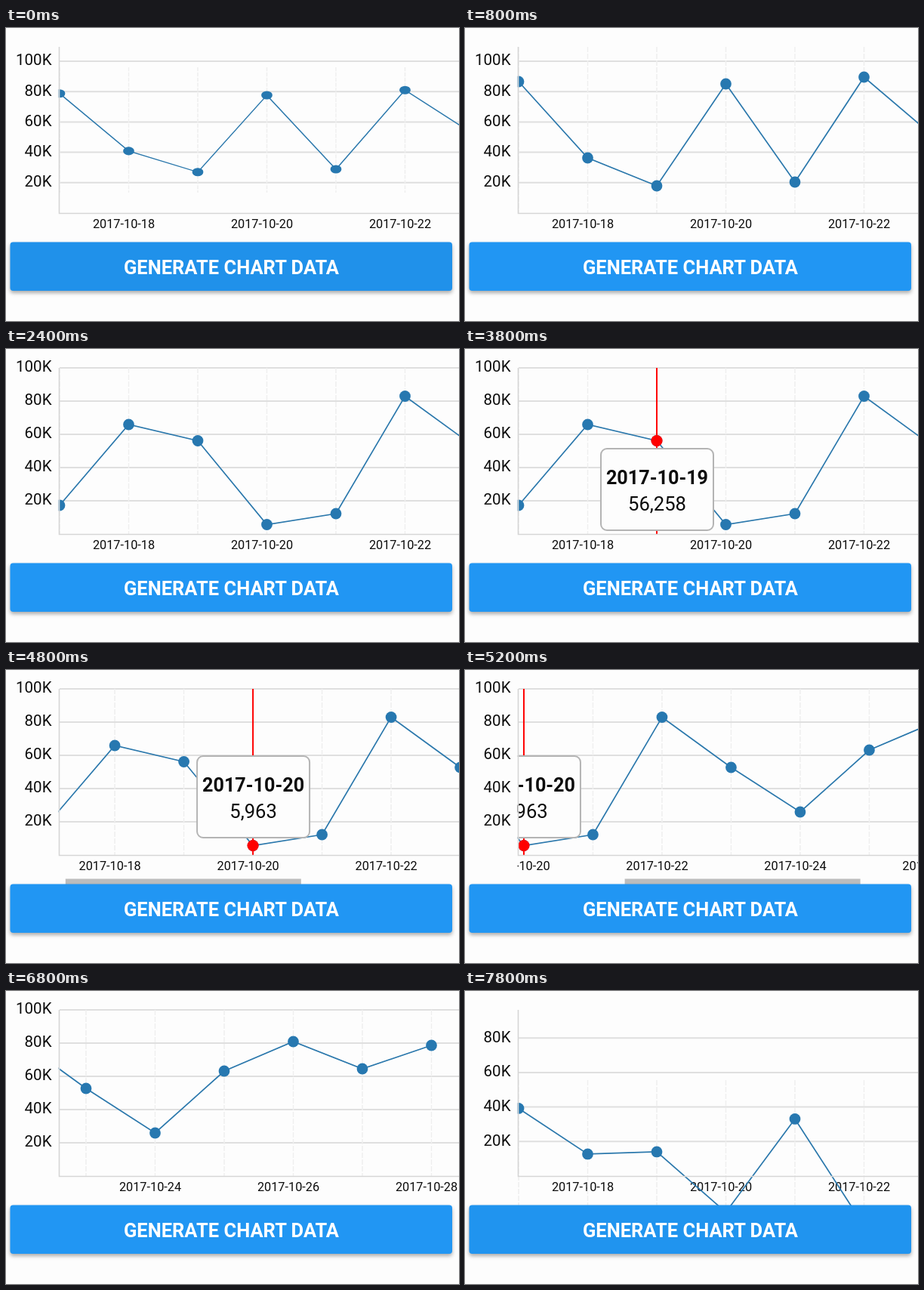
Animation, 600 px wide and 388 px high, one loop 8000 ms. Source, as an HTML page:

```html
<!DOCTYPE html>
<html lang="en">
<head>
<meta charset="utf-8">
<title>Chart data</title>
<style>
  html, body { margin: 0; width: 100%; height: 100%; overflow: hidden; background: #fdfdfd; }
  svg { display: block; width: 600px; height: 388px; font-family: Roboto, sans-serif; fill: #0c0c0c; }
  .grid { stroke: #dfdfdf; stroke-width: 2; }
  .axis { stroke: #d6d6d6; stroke-width: 1.6; }
  .day { stroke: #efefef; stroke-width: 1.5; stroke-dasharray: 7 2; }
  .line { fill: none; stroke: #2b78ac; stroke-width: 1.7; }
  .dot { fill: #2778b0; }
  .tick { font-size: 20.5px; text-anchor: end; }
  .date { font-size: 16.3px; text-anchor: middle; }
  .tip text { font-size: 25.6px; text-anchor: middle; }
  .tip .title { font-size: 25.2px; font-weight: 700; }
  .press { font-size: 25.5px; font-weight: 700; text-anchor: middle; fill: #fff; }
  .button { filter: drop-shadow(0 3px 2.5px rgba(0, 0, 0, .32)); }
</style>
</head>
<body>
<svg viewBox="0 0 600 388">
  <defs><clipPath id="view"><rect x="69.5" y="0" width="531" height="284"/></clipPath></defs>
  <g id="scales"></g>
  <g clip-path="url(#view)">
    <g id="dates"></g>
    <g id="charts"></g>
    <g id="tips"></g>
    <rect id="bar" y="276.5" width="312" height="8" fill="#bdbdbd"/>
  </g>
  <path class="axis" d="M70.5 25V245.5H600" fill="none"/>
  <rect class="button" x="5.5" y="283.5" width="585.5" height="64.5" rx="4" fill="#2196f3"/>
  <rect id="shade" x="5.5" y="283.5" width="585.5" height="64.5" rx="4" fill="#000"/>
  <text class="press" x="298.5" y="326">GENERATE CHART DATA</text>
</svg>
<script>
const LOOP = 8000, TICK = 200, ENTER = 500;
const TOP = 25, BASE = 245, MID = 135, STEP = 91.5, DAYS = 12;
const $ = id => document.getElementById(id);
const dayX = i => 71 + i * STEP;
const grow = k => `translate(0 ${MID}) scale(1 ${k}) translate(0 ${-MID})`;
const rise = k => `translate(0 ${220 * (1 - k)})`;

// gap: pixels per 20K; start: when the data set enters
const sets = [
  { start: -252, gap: 40.2, enter: grow, ys: [71, 172, 209, 74, 204, 65, 143] },
  { start: 1375, gap: 44, enter: grow,
    ys: [207, 100, 121.5, 232.5, 218, 62.5, 129, 188, 106, 67, 103, 72] },
  { start: 7625, gap: 45.7, enter: rise, ys: [62.5, 123, 120, 200, 76.5, 218, 205] }
];
const tips = [
  { from: 3200, to: 4400, day: 2, value: '56,258' },
  { from: 4400, to: 7625, day: 3, value: '5,963' }
];
const shadeSteps = [[0, .035], [500, 0], [1000, 0], [1300, .06], [1400, .06], [2000, 0], [7400, 0], [7800, .015], [LOOP, .025]];
const barSteps = [[4700, 0], [4800, 1], [6250, 1], [6650, 0]];

const repeat = (n, fn) => Array.from({ length: n }, (_, i) => fn(i)).join('');

function scaleMarkup({ gap }) {
  const rows = repeat(5, i => {
    const y = BASE - gap * (i + 1);
    return y < TOP ? '' : `<path class="grid" d="M71 ${y}H600"/>
      <text class="tick" x="60.5" y="${y + 5.3}">${(i + 1) * 20}K</text>`;
  });
  return `<g>${rows}</g>`;
}

function chartMarkup({ ys }) {
  const points = ys.map((y, i) => `${dayX(i)},${y}`).join(' ');
  return `<g>${repeat(DAYS, i => `<path class="day" d="M${dayX(i)} ${TOP}V${BASE}"/>`)}
    <polyline class="line" points="${points}"/>
    ${repeat(ys.length, i => `<circle class="dot" cx="${dayX(i)}" cy="${ys[i]}" r="7.4"/>`)}</g>`;
}

function tipMarkup({ day, value }) {
  const x = dayX(day), y = sets[1].ys[day];
  const top = y < MID ? y + 10.5 : y - 118.5;
  return `<g class="tip">
    <path d="M${x} ${TOP}V${BASE}" stroke="#f00" stroke-width="2"/>
    <rect x="${x - 74}" y="${top}" width="149" height="108" rx="8" fill="#fdfdfd" stroke="#b4b4b4" stroke-width="2"/>
    <text class="title" x="${x + .5}" y="${top + 47}">2017-10-${17 + day}</text>
    <text x="${x + .5}" y="${top + 82}">${value}</text>
    <circle cx="${x}" cy="${y}" r="7.6" fill="#f00"/></g>`;
}

$('scales').innerHTML = sets.map(scaleMarkup).join('');
$('charts').innerHTML = sets.map(chartMarkup).join('');
$('tips').innerHTML = tips.map(tipMarkup).join('');
$('dates').innerHTML = repeat(DAYS / 2, i =>
  `<text class="date" x="${dayX(2 * i + 1) - 6.5}" y="265">2017-10-${18 + 2 * i}</text>`);

function valueAt(steps, t) {
  const next = steps.findIndex(([time]) => time > t);
  if (next < 0) return steps[steps.length - 1][1];
  if (next === 0) return steps[0][1];
  const [t0, a] = steps[next - 1], [t1, b] = steps[next];
  return a + (b - a) * (t - t0) / (t1 - t0);
}

const progress = (t, from, to) => Math.min(1, Math.max(0, (t - from) / (to - from)));
const show = (el, on) => el.setAttribute('display', on ? 'inline' : 'none');

function render(t) {
  const current = sets.reduce((found, set, i) => t >= set.start ? i : found, 0);
  sets.forEach((set, i) => {
    show($('scales').children[i], i === current);
    show($('charts').children[i], i === current);
  });

  const { start, enter } = sets[current];
  const entered = 1 - (1 - progress(t, start, start + ENTER)) ** 2;
  const scroll = current === 1 ? 514 * Math.sin(progress(t, 4772, 6000) * Math.PI / 2) : 0;
  const shift = `translate(${-scroll} 0)`;
  $('charts').children[current].setAttribute('transform', `${shift} ${enter(entered)}`);
  $('dates').setAttribute('transform', shift);
  $('tips').setAttribute('transform', shift);
  tips.forEach((tip, i) => show($('tips').children[i], t >= tip.from && t < tip.to));

  $('bar').setAttribute('x', 69 + scroll * .533);
  $('bar').setAttribute('opacity', valueAt(barSteps, t));
  $('shade').setAttribute('opacity', valueAt(shadeSteps, t));
}

const origin = performance.now();
function frame() {
  const t = (performance.now() - origin) % LOOP;
  render(Math.floor(t / TICK) * TICK);
  requestAnimationFrame(frame);
}
frame();
</script>
</body>
</html>
```
